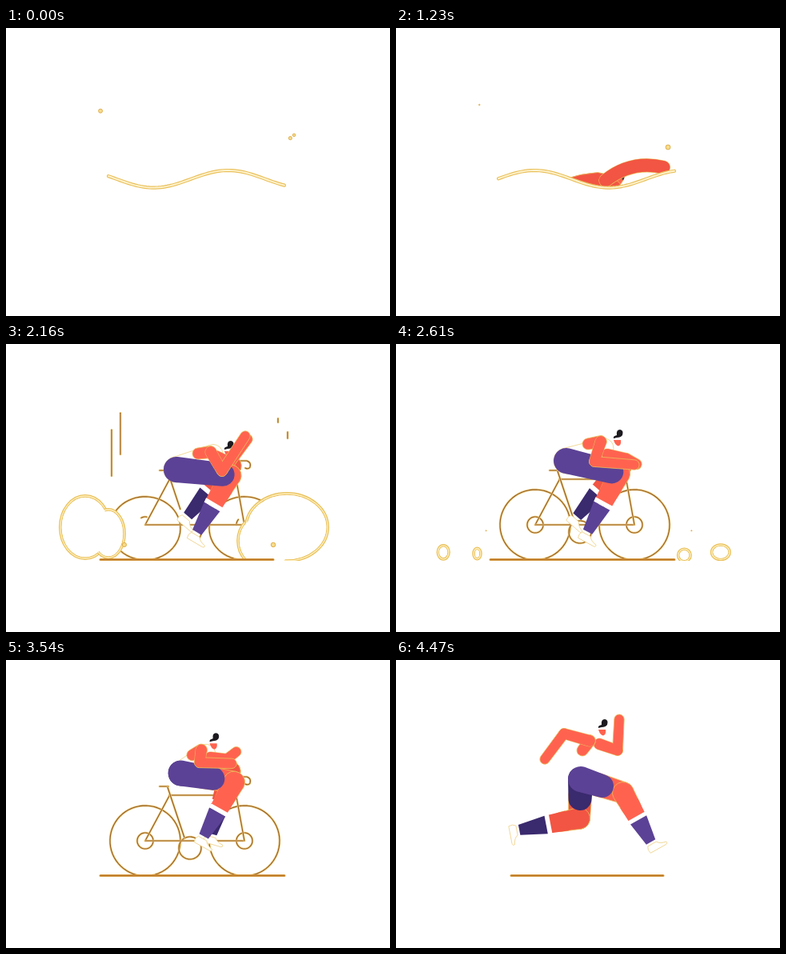
Animation, 480 px wide and 360 px high, one loop 4.5 s. Source, as an HTML page:

```html
<!DOCTYPE html>
<html lang="en">
<head>
<meta charset="utf-8">
<title>Triathlon</title>
<style>
html, body { margin: 0; width: 100%; height: 100%; overflow: hidden; background: #fff; }
svg { display: block; width: 100vw; height: 100vh; }
</style>
</head>
<body>
<svg id="stage" viewBox="0 0 480 360"></svg>
<script>
const LOOP = 4500, SWIM = 1650, STROKE = 480, TAU = Math.PI * 2;
const RED = '#ff6350', DEEP = '#f25543', PURPLE = '#5c4296', DARK = '#3a2a6e', INK = '#1d1a20';
const GOLD = '#e9c15c', BROWN = '#94602a';
const stage = document.getElementById('stage');

const clamp = v => Math.max(0, Math.min(1, v));
const part = (t, a, b) => clamp((t - a) / (b - a));
const smooth = u => u * u * (3 - 2 * u);
const lerp = (a, b, u) => a + (b - a) * u;
const mix = (a, b, u) => a.map((v, i) => lerp(v, b[i], u));
const n = v => v.toFixed(2);

// Value on a list of [position, value] keys
function track(p, keys) {
  let i = 1;
  while (i < keys.length - 1 && p > keys[i][0]) i++;
  const [a, x] = keys[i - 1], [b, y] = keys[i];
  return lerp(x, y, part(p, a, b));
}

// ---- drawing helpers
const fill = (d, color, edge = '') =>
  `<path d="${d}" fill="${color}"${edge ? ` stroke="${edge}" stroke-width=".8"` : ''}/>`;
const stroke = (d, color, w) =>
  `<path d="${d}" fill="none" stroke="${color}" stroke-width="${w}" stroke-linecap="round" stroke-linejoin="round"/>`;
const wire = d => stroke(d, '#efca78', 2.6) + stroke(d, BROWN, 1.1);
const seg = (x1, y1, x2, y2) => `M${n(x1)} ${n(y1)}L${n(x2)} ${n(y2)}`;
const group = (s, x, y, rot = 0) => `<g transform="translate(${n(x)} ${n(y)}) rotate(${n(rot)})">${s}</g>`;
const dot = (x, y, r) => r < .2 ? '' :
  `<circle cx="${n(x)}" cy="${n(y)}" r="${n(r)}" fill="#f7dc8a" stroke="#dca944" stroke-width=".9"/>`;

function arc(cx, cy, rx, ry, from, sweep) {
  let d = '';
  const steps = Math.max(2, Math.ceil(sweep / 6));
  for (let i = 0; i <= steps; i++) {
    const a = (from + sweep * i / steps) * TAU / 360;
    d += (i ? 'L' : 'M') + n(cx + rx * Math.cos(a)) + ' ' + n(cy + ry * Math.sin(a));
  }
  return d;
}

// Tapered limb piece from a to b, with round or flat ends
function taper(a, b, ra, rb, flat) {
  const dx = b[0] - a[0], dy = b[1] - a[1], l = Math.hypot(dx, dy) || 1;
  const x = -dy / l, y = dx / l;
  const at = (p, r) => n(p[0] + x * r) + ' ' + n(p[1] + y * r);
  const to = (r, p) => flat ? `L${p}` : `A${r} ${r} 0 0 0 ${p}`;
  return `M${at(a, ra)}L${at(b, rb)}${to(rb, at(b, -rb))}L${at(a, -ra)}${to(ra, at(a, ra))}Z`;
}

// ---- water
function wavePath(crest, amp, base, x0, x1) {
  let d = '';
  for (let i = 0; i <= 60; i++) {
    const x = lerp(x0, x1, i / 60);
    d += (i ? 'L' : 'M') + n(x) + ' ' + n(base - amp * Math.cos((x - crest) * TAU / 186));
  }
  return d;
}
const clipAbove = line =>
  `<defs><clipPath id="above"><path d="${line}L480 270L480 -20L0 -20L0 270Z"/></clipPath></defs>`;
const clipped = s => `<g clip-path="url(#above)">${s}</g>`;
const waterLine = d => stroke(d, GOLD, 4.2) + stroke(d, '#fff3cf', 1.9);

function swimmer(p) {
  const x = 244 + 32 * p;
  const y = track(p, [[0, 206], [.19, 178], [.56, 190], [.8, 217], [1, 206]]);
  const deg = track(p, [[0, -200], [.19, -124], [.56, -14], [.8, 50], [1, 160]]);
  const bend = track(p, [[0, -14], [.19, -14], [.56, 18], [1, 10]]);
  const a = deg * TAU / 360, c = Math.cos(a), s = Math.sin(a);
  const armPath = `M0 0Q${n(37 * c + bend * s)} ${n(37 * s - bend * c)} ${n(74 * c)} ${n(74 * s)}`;
  const fade = part(p, .22, .42);
  const head = fill('M-5 0Q-5 -10 0 -10Q5 -10 5 0Q4 10 0 11Q-4 10 -5 0Z', RED, GOLD) +
    fill('M-5 -3Q-5 -10 0 -10Q5 -10 5 -3Q0 -6 -5 -3Z', '#4a3238');
  let out = '';
  if (p > .06 && fade < 1)
    out += wire(arc(-3, -4, 76, 76, lerp(-190, deg - 6, fade), Math.max(1, (deg + 184) * (1 - fade))));
  out += group(head, track(p, [[.19, 25.5], [.56, 16]]), track(p, [[.19, -7], [.56, 0]]), track(p, [[.19, 0], [.56, 32]]));
  out += fill('M-90 20Q-55 -7 -10 -10Q8 -8 18 4L20 30L-90 30Z', DEEP, GOLD);
  out += stroke(armPath, GOLD, 17.4) + stroke(armPath, DEEP, 16.2);
  return group(out, x, y);
}

function splash(p) {
  let out = '';
  const k = p < .3 ? p + 1 : p;
  const q = part(k, .54, 1.21);
  if (k > .5 && q < 1) {
    const e = q ** 4, r = Math.sin(Math.PI * q);
    out += dot(104 + 41 * e + 7 * q, 96 + 34 * e, .5 + 2.4 * r);
  }
  const u = part(k, .45, 1.22);
  if (k > .45 && u < 1) out += dot(336 + 27 * u, 152 - 20 * u, 3 * Math.sqrt(1 - u * u));
  const v = part(k, .6, 1.12);
  if (k > .6 && v < 1) out += dot(340 + 26 * v, 147 - 17 * v, 2.8 * Math.sqrt(1 - v * v));
  return out;
}

function swim(t) {
  const p = (t / STROKE) % 1;
  const crest = 278 - 186 * t / STROKE;
  const edge = wavePath(crest, 10.8, 188.8, 0, 480);
  return clipAbove(edge) + splash(p) + clipped(swimmer(p)) + waterLine(wavePath(crest, 10.8, 188.8, 128, 348));
}

// ---- poses: head, shoulder cap, near arm x3, far arm x3, hip, near knee+ankle, far knee+ankle
const pts = (...v) => v.map((x, i) => i % 2 ? null : [x, v[i + 1]]).filter(Boolean);
const blend = (a, b, u) => a.map((p, i) => mix(p, b[i], u));

function knee(hip, foot) {
  const l1 = 68, l2 = 86, dx = foot[0] - hip[0], dy = foot[1] - hip[1], d = Math.hypot(dx, dy);
  const a = (l1 * l1 - l2 * l2 + d * d) / (2 * d), h = Math.sqrt(Math.max(0, l1 * l1 - a * a));
  return [hip[0] + (a * dx + h * dy) / d, hip[1] + (a * dy - h * dx) / d];
}
const RIDE = pts(277, 118, 240, 125, 256, 122, 248, 147, 298, 151, 264, 138, 288, 143, 301, 150, 213, 146);
const LAND = pts(278, 132, 240, 137, 256, 135, 270, 159, 299, 115, 262, 140, 280, 148, 302, 119, 213, 157);
const JUMP = pts(220, 63, 216, 102, 217, 88, 228, 82, 246, 77, 236, 82, 249, 77, 258, 31, 231, 128,
  297, 136, 302, 224, 279, 94, 291, 186);
const RUN = pts(258, 85, 233, 113, 242, 101, 210, 92, 186, 124, 254, 105, 277, 113, 279, 74, 231, 149,
  284, 166, 320, 230, 229, 198, 151, 213);
const SWAP = [0, 1, 2, 6, 7, 5, 3, 4, 8, 11, 12, 9, 10].map(i => RUN[i]);
const lift = (pose, y) => pose.map(p => [p[0], p[1] + y]);

function riding(t) {
  const body = blend(LAND, RIDE, smooth(part(t, 2160, 2400)));
  const a = (119 + (t - 3150) / 457 * 360) * TAU / 360;
  const foot = s => [231 + s * 12 * Math.cos(a), 228 + s * 12 * Math.sin(a)];
  const near = foot(1), far = foot(-1), hip = body[8];
  return [...body, knee(hip, near), near, knee(hip, far), far];
}

function poseAt(t) {
  if (t < 3270) return riding(t);
  const start = riding(3270);
  const keys = [[3270, start], [3420, lift(start, 4)], [3750, lift(JUMP, -6)],
    [3870, JUMP], [4200, SWAP], [4470, RUN]];
  let i = 1;
  while (i < keys.length - 1 && t > keys[i][0]) i++;
  return blend(keys[i - 1][1], keys[i][1], smooth(part(t, keys[i - 1][0], keys[i][0])));
}

// ---- figure
function shoe(a, k) {
  const rot = Math.atan2(k[0] - a[0], a[1] - k[1]) * 360 / TAU;
  return group(fill('M-6 0L6 0Q9 5 17 6Q18 9 15 9L-7 9Q-9 4 -6 0Z', '#fff', '#efd28a'), a[0], a[1], rot);
}

function leg(hip, k, a, shorts, skin, cloth) {
  const cuff = mix(hip, k, shorts), on = u => mix(k, a, u);
  return shoe(a, k) +
    fill(taper(mix(hip, k, .4), k, 14.5, 13.5), skin, GOLD) +
    fill(taper(k, on(.3), 13.5, 12), skin, GOLD) +
    fill(taper(on(.2), on(.47), 12.5, 11.5, 1), skin) +
    fill(taper(on(.46), on(.53), 12, 11.5, 1), '#fff') +
    fill(taper(on(.53), on(.96), 11.5, 6.5, 1), cloth) +
    fill(taper(hip, cuff, 16, 14.5), cloth);
}

const arm = (s, e, h, skin) =>
  fill(taper(s, e, 7, 6.5), skin, GOLD) + fill(taper(e, h, 6.5, 6.2), skin, GOLD) + fill(taper(s, e, 6.8, 6.2), skin);

const HEAD = fill('M-5 2L4 2Q5 8 1 9.5Q-3 9 -5 2Z', RED) +
  fill('M-5 0Q-6 -3 -1 -4Q-2 -11 3 -11Q8 -10 6 -4Q4 -1 -1 -1Z', INK);

function figure(t) {
  const [head, cap, ns, ne, nh, fs, fe, fh, hip, nk, na, fk, fa] = poseAt(t);
  const off = smooth(part(t, 3270, 3700));
  const chest = mix(ns, fs, .5), shorts = lerp(.86, .5, off);
  return leg(hip, fk, fa, shorts, DEEP, DARK) +
    fill(taper(hip, chest, lerp(16, 13, off), 12), '#fff', off < .9 ? '#efd07c' : '') +
    group(HEAD, head[0], head[1]) +
    arm(fs, fe, fh, RED) +
    leg(hip, nk, na, shorts, RED, PURPLE) +
    fill(taper(ns, cap, 7.5, 7), RED, GOLD) +
    arm(ns, ne, nh, RED);
}

// ---- bike
function bike(t) {
  const q = part(t, 3720, 4020);
  if (q >= 1) return '';
  const sq = t < 2160 ? lerp(1, .9, part(t, 2070, 2160)) : lerp(.9, 1, smooth(part(t, 2160, 2340)));
  const grow = part(t, 2130, 2400);
  const left = clamp(1 - 1.2 * q * q), cy = 270 - 44 * sq;
  const rx = 26 * q, ry = -26 * q, fx = 38 * q, fy = 132 * q * q;
  const ring = (x, y, a, b, from, f) => f > .02 ? wire(arc(x, y, a, b, from, 360 * f)) : '';
  const hub = clamp(1 - 1.65 * q) * grow;
  let out = ring(174 + rx, cy + ry, 44, 44 * sq, -10, left) +
    ring(298 + fx, cy + fy, 44, 44 * sq, -7, clamp(1 - .6 * q * q - q ** 5)) +
    ring(174 + rx, 226 + ry, 10, 10, -120, hub) +
    ring(298 + fx, 226 + fy, 10, 10, 180, hub) +
    ring(230 + rx, 235 + ry, 14, 14, -10, left * grow);
  const f = 1 - part(q, 0, .45);
  const bar = (x1, y1, x2, y2) => f > 0 ? wire(seg(x1, y1, lerp(x1, x2, f), lerp(y1, y2, f))) : '';
  out += bar(174, 226, 204, 170) + bar(174, 226, 297, 226) + bar(204, 169, 286, 169) + bar(298, 226, 286, 160);
  if (f > 0) out += wire('M286 160L284 146L301 146Q307 148 305 154Q303 157 299 155');
  const g = 1 - part(q, .3, 1), tube = g * lerp(.72, 1, grow);
  out += wire(seg(192 + 4 * q, 158 - 16 * q, 192 + 4 * q + 11 * g, 158 - 16 * q));
  out += wire(seg(202 + 4 * q, 159 - 18 * q, lerp(202, 223, tube) + 4 * q, lerp(159, 222, tube) - 18 * q - 26 * q * g));
  return out;
}

// ---- dust and speed lines
function dust(t) {
  const u = part(t, 2040, 2160), v = part(t, 2160, 2670);
  if (!u || v >= 1) return '';
  const s = Math.sqrt(u) * (1 - v * v);
  // x, height of centre, radii, drift
  const puffs = [[99, 40, 31, 39, -45], [128, 32, 20, 30, -30], [325, 23, 35, 35, 40], [351, 40, 51, 42, 62]];
  let edge = '', inside = '';
  for (const [x, up, rx, ry, dx] of puffs) {
    const cx = x + dx * v - dx * .9 * (1 - u);
    const e = w => `<ellipse cx="${n(cx)}" cy="${n(269 - up * s)}" rx="${n(Math.max(0, rx * s + w))}" ry="${n(Math.max(0, ry * s + w))}"`;
    edge += e(0) + ` fill="none" stroke="${GOLD}" stroke-width="3.8"/>` +
      e(0) + ' fill="none" stroke="#fff0c0" stroke-width="1.3"/>';
    inside += e(-1.7) + ' fill="#fff"/>';
  }
  return clipped(edge + inside) + dot(148 - 40 * v, 251 - 20 * v, 2.6 * s) + dot(334 + 40 * v, 251 - 20 * v, 2.8 * s);
}

function streaks(t) {
  const u = part(t, 1830, 2130), v = part(t, 2160, 2310);
  if (!u || v >= 1) return '';
  return [[132, 107, 165], [143, 86, 138], [340, 93, 98], [352, 110, 118]].map(([x, a, b]) =>
    wire(seg(x, lerp(a, b, v), x, lerp(a, b, u)))).join('');
}

const groundLine = d => stroke(d, '#dfa648', 3) + stroke(d, '#b8752b', 1.5);

function ground(t) {
  const draw = (a, b) => groundLine(seg(a, 269.5, b, 269.5));
  if (t < 3780) return draw(118, lerp(334, 348, part(t, 2160, 2400)));
  const gap = part(t, 3780, 3870), u = smooth(part(t, 3870, 4350));
  const tail = 130 - 12 * part(t, 3870, 3960);
  return (t < 3960 ? draw(118, tail) : '') + draw(lerp(lerp(130, 155, gap), 144, u), lerp(348, 334, u));
}

function land(t) {
  if (t >= 2070) {
    return clipAbove('M0 271L480 271') + clipped(bike(t)) + dust(t) + ground(t) + streaks(t) + figure(t);
  }
  const w = part(t, SWIM, 2070), rise = smooth(part(t, SWIM, 1770));
  const base = lerp(189, 269.5, w * w), amp = 11 * clamp(1 - 3 * w);
  const crest = 278 - 186 * t / STROKE, y = -70 * (1 - w * w) + 110 * (1 - rise);
  const line = wavePath(crest, amp, base, lerp(128, 118, w), lerp(348, 334, w));
  return clipAbove(wavePath(crest, amp, base + 1.5, 0, 480)) +
    clipped(group(bike(t) + figure(t), 0, y)) + dust(t) +
    (w < .35 ? waterLine(line) : groundLine(line)) + streaks(t);
}

function render(now) {
  const t = now % LOOP;
  stage.innerHTML = t < SWIM ? swim(t) : land(t);
}

const begin = performance.now();
function tick() {
  render(performance.now() - begin);
  requestAnimationFrame(tick);
}
tick();
</script>
</body>
</html>
```
